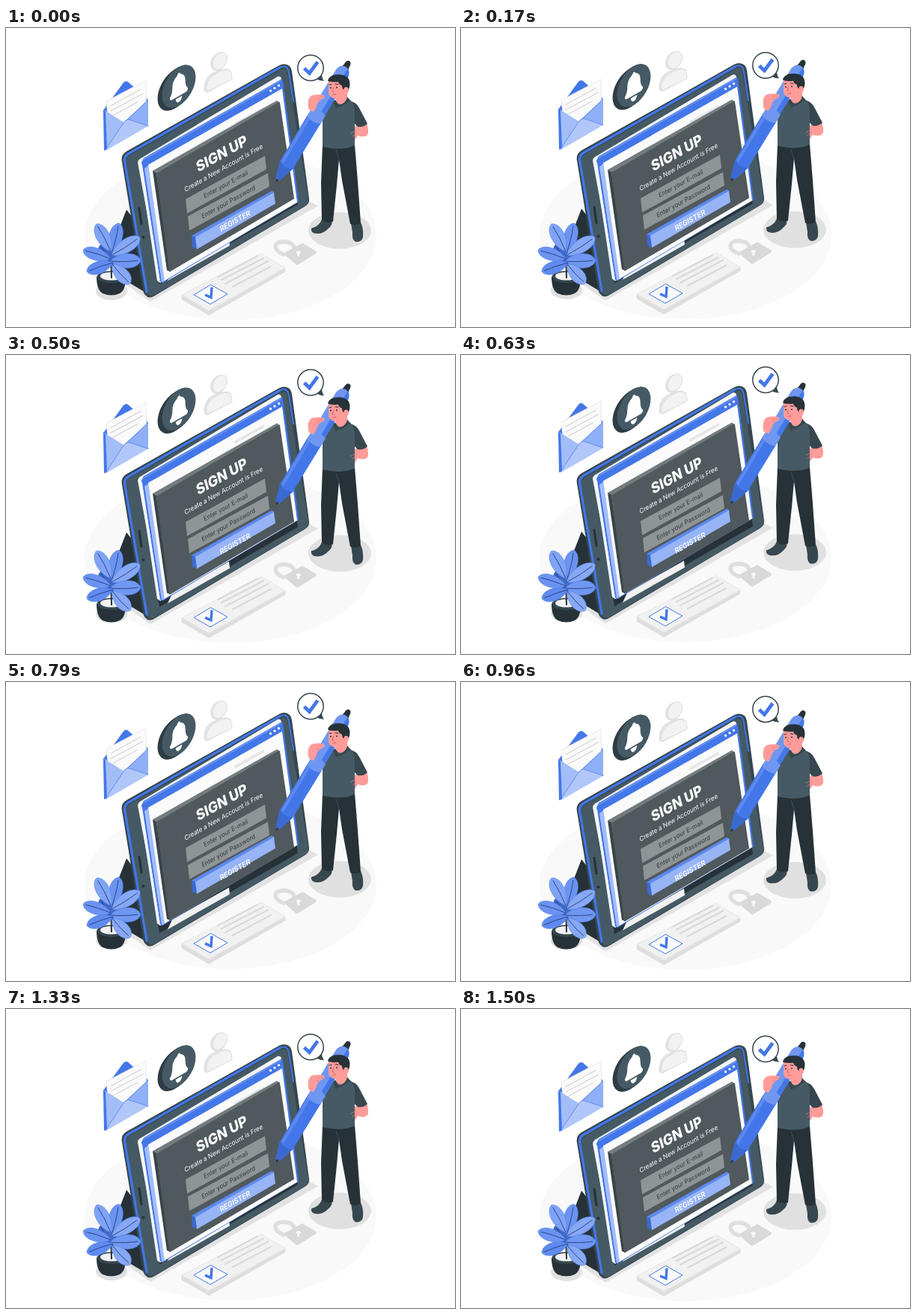
These frames come from a looping animation (600 by 400 pixels, 1.54 s). An HTML page:

```html
<!DOCTYPE html>
<html lang="en">
<head>
<meta charset="utf-8">
<title>Sign up</title>
<style>
html, body { margin: 0; width: 100%; height: 100%; overflow: hidden; background: #fff; }
svg { display: block; width: 100vw; height: 100vh; }
text { font-family: Inter, Roboto, sans-serif; text-anchor: middle; }
.blue { fill: #4377e9; }
.mid { fill: #6f97f1; }
.pale { fill: #a3bdf8; }
.slate { fill: #455a64; }
.deep { fill: #37474f; }
.ink { fill: #263238; }
.skin { fill: #ff9c9a; }
.line { fill: none; stroke-linecap: round; stroke-linejoin: round; }
.round { stroke-linejoin: round; }
.butt { stroke-linecap: butt; stroke-linejoin: miter; }
</style>
</head>
<body>
<svg viewBox="0 0 600 400">
  <g id="scene">
    <ellipse cx="300" cy="278" rx="195" ry="113" fill="#f9f9f9"/>
    <ellipse cx="446" cy="271" rx="42" ry="24.5" fill="#e0e0e0"/>
    <ellipse cx="141" cy="352" rx="21" ry="12" fill="#e0e0e0"/>
    <path d="M160 343L193 366L417 238L398 228Z" fill="#e2e2e2"/>

    <!-- form card -->
    <g class="round">
      <path d="M235 357V363L271 384L373 326V321L271 375Z" fill="#dedede" stroke="#dedede"/>
      <path d="M235 357L341 302L373 321L271 378Z" fill="#f1f1f1" stroke="#e6e6e6"/>
      <path class="line" d="M283 333L336 305M288 337L344 308M293 342L350 312M303 346L354 319" stroke="#d9d9d9" stroke-width="2.2"/>
      <path d="M251 357L273.500 343.500L296 356L273 369.500Z" fill="#fafafa" stroke="#4377e9"/>
      <path class="line butt" d="M266 357L274 360.500L275 347" stroke="#4377e9" stroke-width="3.400"/>
    </g>

    <!-- padlock -->
    <path class="line" d="M371 303C356 297 357 286 371 286C382 286 385 291 387 298" stroke="#dedede" stroke-width="5.500"/>
    <path class="round" d="M374 302L396 290L413 300L389 315Z" fill="#d9d9d9" stroke="#d9d9d9" stroke-width="4"/>
    <path d="M388 299Q391 297 393.500 299Q395 301 392 302L392.500 306L389 305L389.500 302Q387 301 388 299Z" fill="#f8f8f8"/>

    <!-- envelope -->
    <path class="blue round" d="M130 110L157 73Q160 70 163 72L189 95L188 128L134 162Z"/>
    <g id="letter">
      <path d="M134 98L187 70L188 118L139 146Z" fill="#fafafa" stroke="#e4e4e4" stroke-width=".7"/>
      <path class="line" d="M140 104L180 82M140 111L183 88M143 117L176 99" stroke="#d5d5d5" stroke-width="1.200"/>
    </g>
    <path class="pale" d="M130 109L157 126L190 96V131L133 164Z"/>
    <path d="M190 96L162 122L190 131Z" fill="#8fb0f6"/>
    <path d="M133 164L157 127Q161 121 166 123L190 131Z" fill="#b1c7fa"/>
    <path class="line" d="M133 163L157 127Q161 121 166 123L190 131M190 96L163 122" stroke="#5e88ec" stroke-width=".9"/>
    <path d="M130 109L133 112L135 162L131 164Z" class="blue"/>

    <!-- bell badge -->
    <g fill="#2f3d45" id="rim"></g>
    <ellipse class="slate" transform="translate(231 78) rotate(30)" rx="18.500" ry="31.500"/>
    <g transform="matrix(.866 -.5 0 1 231 79)" fill="#fff">
      <path d="M-3 -16Q0 -22 3 -16Q10 -13 10 -4Q10 4 14 8Q14 12 10 12H-10Q-14 12 -14 8Q-10 4 -10 -4Q-10 -13 -3 -16Z"/>
      <path d="M-5 14H5Q4 20 0 20Q-4 20 -5 14Z"/>
    </g>

    <!-- profile icon -->
    <g stroke="#dedede" stroke-width=".8">
      <path d="M265 84V77Q267 63 279 59Q293 52 300 57L302 66L301 69L269 86Z" fill="#e3e3e3"/>
      <ellipse cx="284" cy="45" rx="9.500" ry="13" transform="rotate(30 284 45)" fill="#e3e3e3"/>
      <path d="M268 85V78Q270 66 281 61Q294 53 300 58Q302 61 302 69Z" fill="#f2f2f2"/>
      <ellipse cx="286" cy="44" rx="8.500" ry="12.500" transform="rotate(30 286 44)" fill="#f2f2f2"/>
    </g>

    <!-- tablet -->
    <path class="ink" d="M149 274L161 243L176 262L190 356L150 332Z"/>
    <path class="deep" d="M155 179Q153 170 161 165L365 50Q373 46 379 51Q381 53 382 58L405 228Q406 235 399 239L199 358Q191 363 187 358Q184 356 183 350Z"/>
    <path class="slate" d="M161 182Q159 174 166 170L367 56Q374 52 376 60L404 228Q405 235 398 239L200 356Q190 362 188 351Z"/>
    <path class="line" d="M188 353L159 181Q157 172 164 168L366 53" stroke="#4377e9" stroke-width="3.200"/>
    <path class="line" d="M366 53Q376 48 378 60L384 98" stroke="#4377e9" stroke-width="2"/>
    <path class="line" d="M178 241L181 262" stroke="#263238" stroke-width="3"/>
    <circle class="ink" cx="183.500" cy="280" r="2"/>
    <path class="ink" d="M182 186L370 78L390 236L205 343Z"/>
    <path d="M216 338L222 325L298 282L299 291Z" fill="#f1f1f1"/>

    <g id="page">
      <path d="M176 180Q176 177 179 175L363 65Q367 64 368 68L390 233L206 341Z" fill="#f6f6f6"/>
      <path class="blue" d="M181 180L184 174L367 69Q369 68 370 71L391 232L209 341L206 339Z"/>
      <path d="M178 180L182 183L206 341L202 338Z" fill="#f6f6f6"/>
      <path class="pale" d="M185 188L190 184L213 338L208 340Z"/>
      <path d="M190 183L369 81L389 233L212 338Z" fill="#fbfbfb"/>
      <path class="line" d="M184 176L367 70.500" stroke="#6f97f1" stroke-width="1.500"/>
      <path d="M305 127L345 105V109L306 131Z" fill="#e6e6e6"/>
      <g fill="#fff">
        <circle cx="353.500" cy="84" r="1.700"/>
        <circle cx="359" cy="80.500" r="1.700"/>
        <circle cx="364.500" cy="77" r="1.700"/>
      </g>
    </g>

    <!-- sign-up panel -->
    <path d="M196 191L362 97L366 100L201 195Z" fill="#737b7e"/>
    <path d="M196 191L201 194L220 326L215 324Z" fill="#394449"/>
    <path class="round" d="M202 195L365 100L384 228L219 325Z" fill="#50595d" stroke="#50595d" stroke-width="2"/>
    <path d="M240 229L346 171L348 189L242 248Z" fill="#8f9597"/>
    <path d="M243 252L350 194L352 212L245 271Z" fill="#8f9597"/>
    <g id="button">
      <path d="M248 278L355 218L359 220L254 281Z" fill="#5d89ef"/>
      <path d="M248 278L253 280L255 296L249 293Z" fill="#3b69d2"/>
      <path d="M253 280L358 220L360 235L255 296Z" fill="#97b4f6"/>
    </g>
    <g fill="#fff">
      <text transform="matrix(.866 -.49 .28 .98 290 174.500)" font-size="19" font-weight="800">SIGN UP</text>
      <text transform="matrix(.866 -.49 .28 .98 291.500 190)" font-size="8.550">Create a New Account is Free</text>
      <text transform="matrix(.866 -.49 .28 .98 307 261.500)" font-size="9.600" font-weight="600">REGISTER</text>
    </g>
    <g fill="#30393d">
      <text transform="matrix(.866 -.48 .28 .98 294.500 212)" font-size="8.300">Enter your E-mail</text>
      <text transform="matrix(.866 -.48 .28 .98 298 235.500)" font-size="8.400">Enter your Password</text>
    </g>

    <!-- man -->
    <path class="deep" d="M422 256L435 258Q437 263 431 268Q424 276 414 275Q407 274 408 268Q419 265 422 256Z"/>
    <path class="deep" d="M461 261L474 260Q478 268 477 280Q475 287 467 286Q462 283 463 274Z"/>
    <path class="ink" d="M423 156L466 156Q468 180 470 205L474 261Q468 265 460 262L449 204L445 176L442 210L437 259Q429 262 422 257L421 207Z"/>
    <path class="line" d="M445 176L441 164" stroke="#455a64" stroke-width=".8"/>
    <path class="skin" d="M470 126L481 124Q486 138 483 143Q479 147 470 144Q467 150 462 152L460 150L465 143L457 147L456 144L465 138L458 139L457 136L468 131Z"/>
    <path class="deep" d="M458 97Q468 99 472 107L483 128Q478 133 470 132L460 122Z"/>
    <path class="slate" d="M438 97L456 94Q465 98 466 110V157Q452 165 423 159V115Q425 101 438 97Z"/>
    <path class="skin" d="M440 88L456 86L456 96Q449 105 441 100Z"/>
    <path class="deep" d="M440 96L446 105L441 108L437 99ZM456 92L460 97L447 106L445 104Q455 100 456 92Z"/>
    <path class="line" d="M463 145L469 140M461 141L468 137" stroke="#e97f7e" stroke-width=".7"/>

    <!-- pen -->
    <g transform="translate(361 206) rotate(31.200)">
      <path class="ink" d="M-4 -182Q-4 -189 0 -189Q4 -189 4 -182L5 -177H-5Z"/>
      <path class="mid" d="M-9.500 -106V-170Q-8 -180 0 -180Q8 -180 9.500 -170V-106Z"/>
      <path class="blue" d="M3 -106V-179Q8 -178 9.500 -170V-106Z"/>
      <path class="blue" d="M-3 -4L-10 -26L-10.500 -100H10.500L10 -26L3 -4Q0 -2 -3 -4Z"/>
      <path d="M-10 -27Q0 -20 10 -27L3 -4Q0 -2 -3 -4Z" fill="#3b69d2"/>
      <path d="M-8.500 -28L-9 -98H-5L-4.500 -25Z" fill="#5d89ef"/>
      <path class="mid" d="M-10.500 -97V-110Q0 -115 10.500 -110V-97Q0 -92 -10.500 -97Z"/>
      <path class="ink" d="M-1.500 -4H1.500L0 1Z"/>
    </g>

    <path class="skin" d="M404 107Q402 93 409 90Q418 88 425 90Q428 93 421 96Q416 99 415 105L411 112Q405 111 404 107Z"/>
    <path class="line" d="M416 93L423 92M415 97L420 95" stroke="#e97f7e" stroke-width=".7"/>
    <path class="skin" d="M431 71L456 70L458 84Q454 94 443 95Q434 95 431 88Z"/>
    <path class="ink" d="M430 71Q431 64 440 62.500Q453 61 458 68Q461 75 458 82L453 84Q449 82 449 77Q445 76 444 72Q436 73 430 71Z"/>
    <ellipse class="skin" cx="454.500" cy="83" rx="3.200" ry="4"/>
    <g class="ink">
      <circle cx="434" cy="80" r="1"/>
      <circle cx="442" cy="79.500" r="1"/>
    </g>
    <path class="line" d="M432 76L435 75.500M440 75L444 75.500" stroke="#263238"/>
    <path class="line" d="M437.500 80L436 85L438 85.500M437 89L441 88.500" stroke="#c95f62" stroke-width=".9"/>

    <!-- speech bubble -->
    <g id="bubble">
      <path class="deep" d="M414 68Q421 67 422 61Q422 67 425 71Q420 71 414 68Z"/>
      <circle cx="407" cy="53.500" r="17.200" fill="#fff" stroke="#37474f" stroke-width="1.500"/>
      <path class="line butt" d="M398.500 54L405.500 60.500L416.500 45.500" stroke="#4377e9" stroke-width="4.800"/>
    </g>
  </g>

  <!-- potted plant -->
  <path class="ink" d="M121 333Q141 321 160 333Q160 351 152 355Q141 360 129 355Q121 350 121 333Z"/>
  <ellipse class="deep" cx="141" cy="333" rx="19.500" ry="8"/>
  <ellipse cx="141" cy="332" rx="15" ry="5.500" fill="#f2f2f2"/>
  <path class="line" d="M141 334L140 298" stroke="#263238" stroke-width="2"/>
  <g id="leaves"></g>
</svg>
<script>
const PERIOD = 1540, LEAD = 35, LIFT = 7.2;
const $ = id => document.getElementById(id);
const scene = $("scene");
// extra rise on top of the shared one
const extra = [[$("page"), 8], [$("button"), 5.5], [$("bubble"), 14], [$("letter"), 1.5]];

$("rim").innerHTML = [0, 1, 2, 3, 4, 5].map(i =>
  `<ellipse transform="translate(${225 + i} ${82 - i * .7}) rotate(30)" rx="18.5" ry="31.5"/>`).join("");

function leaf([x, y, tx, ty, w, fill]) {
  const dx = tx - x, dy = ty - y, len = Math.hypot(dx, dy);
  const nx = -dy / len * w, ny = dx / len * w;
  const at = (k, s) => `${x + dx * k + nx * s} ${y + dy * k + ny * s}`;
  return `<path d="M${x} ${y}C${at(.3, 1)} ${at(.9, 1)} ${tx} ${ty}C${at(.9, -1)} ${at(.3, -1)} ${x} ${y}Z" fill="${fill}" stroke="#4f7ce6" stroke-width=".5"/>` +
    `<path class="line" d="M${x} ${y}Q${at(.5, .15)} ${at(.9, 0)}" stroke="#263d78" stroke-width=".9"/>`;
}

$("leaves").innerHTML = [
  [141, 318, 158, 289, 10, "#3f68c8"],
  [141, 318, 126, 290, 10, "#3f68c8"],
  [141, 302, 151, 261, 12, "#6b94f1"],
  [140, 299, 121, 262, 12, "#7fa3f5"],
  [141, 304, 179, 280, 12, "#86a8f5"],
  [140, 309, 103, 297, 11, "#6b94f1"],
  [139, 312, 180, 311, 13, "#7097f1"],
  [143, 314, 108, 326, 11, "#5f8af0"],
  [142, 316, 166, 342, 12, "#86a8f5"]
].map(leaf).join("");

const raise = (el, dy) => el.setAttribute("transform", `translate(0 ${-dy.toFixed(3)})`);

function draw(t) {
  const k = (1 - Math.cos((t + LEAD) / PERIOD * 2 * Math.PI)) / 2;
  raise(scene, LIFT * k);
  for (const [el, dy] of extra) raise(el, dy * k);
}

let start;
function tick(now) {
  start ??= now;
  draw((now - start) % PERIOD);
  requestAnimationFrame(tick);
}
draw(0);
requestAnimationFrame(tick);
</script>
</body>
</html>
```
